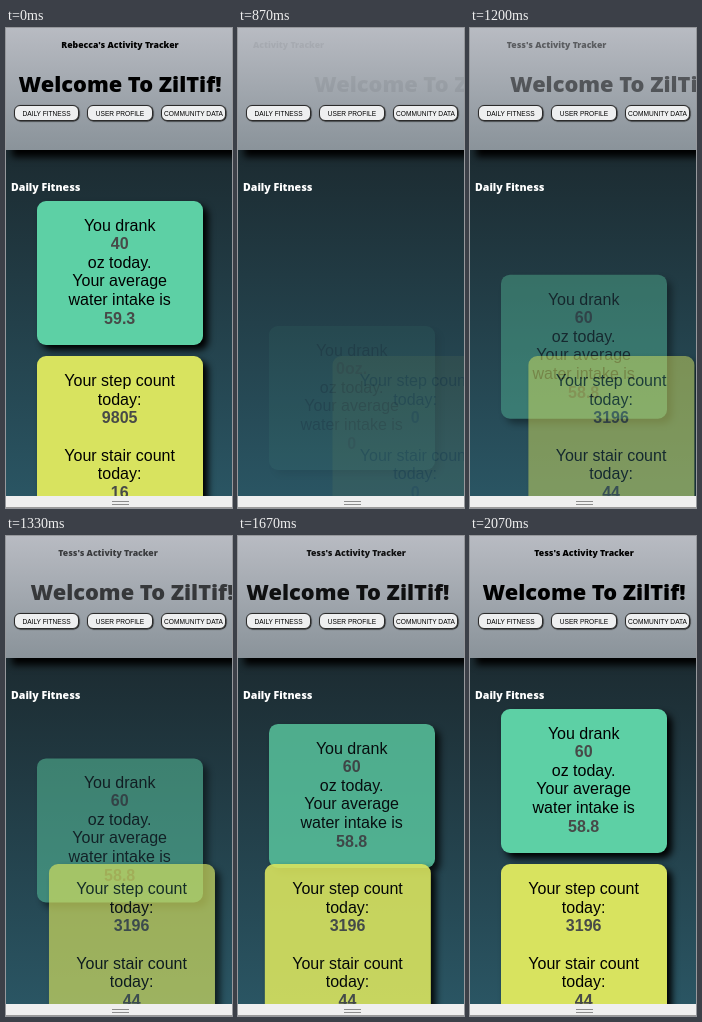
Recreate the animation shown at these times as an HTML page. Size 226 by 480 pixels, loop 2270 ms.

```html
<!DOCTYPE html>
<html lang="en">
<head>
<meta charset="utf-8">
<title>Activity Tracker</title>
<style>
  html, body { margin: 0; width: 100%; height: 100%; overflow: hidden; }
  #stage {
    position: relative; width: 226px; height: 480px; overflow: hidden;
    background: linear-gradient(#1c2b31 122px, #2a5563 468px);
    font-family: "Liberation Sans", Arial, sans-serif;
  }
  #stage div { position: absolute; box-sizing: border-box; white-space: pre; }
  .head { font-family: "Open Sans", sans-serif; font-weight: 800; }
  #header {
    left: 0; top: 0; width: 226px; height: 122px;
    background: linear-gradient(#b8bbc2, #8a939a);
    box-shadow: 6px 7px 7px #000;
  }
  #sub, #title { left: 0; width: 228px; text-align: center; color: #000; }
  #sub { top: 7px; font-size: 8.7px; line-height: 20px; }
  #title { top: 35.5px; font-size: 21.8px; line-height: 40px; }
  .btn {
    top: 77px; height: 16px; border: 1px solid #2b2b2b; border-radius: 6px;
    background: #eeeff0; box-shadow: 0.5px 0.5px 1px #111;
    font-size: 6.6px; line-height: 15px; text-align: center; color: #000;
  }
  #section { left: 5px; top: 149px; font-size: 10.6px; line-height: 20px; color: #fff; }
  .card {
    left: 30.5px; width: 166.3px; padding-top: 15.7px; border-radius: 9px;
    box-shadow: 5px 5px 7px #000;
    font-size: 16px; line-height: 18.6px; text-align: center; color: #000;
  }
  .card b { color: #474a48; }
  #water { top: 173px; height: 144px; background: #5dd0a5; }
  #steps { top: 328px; height: 170px; padding-top: 16.2px; background: #d8e35f; }
  #bar {
    left: 0; top: 468px; width: 226px; height: 12px;
    background: #efefef; border-bottom: 1px solid #999;
  }
  #bar i { position: absolute; left: 106px; width: 17px; height: 1px; background: #8c8c8c; }
</style>
</head>
<body>
<div id="stage">
  <div id="header">
    <div id="sub" class="head"></div>
    <div id="title" class="head">Welcome To ZilTif!</div>
    <div class="btn" style="left:8px;width:65px">DAILY FITNESS</div>
    <div class="btn" style="left:81px;width:66px">USER PROFILE</div>
    <div class="btn" style="left:155px;width:65px">COMMUNITY DATA</div>
  </div>
  <div id="section" class="head">Daily Fitness</div>
  <div id="water" class="card"></div>
  <div id="steps" class="card"></div>
  <div id="bar"><i style="top:5px"></i><i style="top:8px"></i></div>
</div>
<script>
const LOOP = 2270, FPS = 15, RELOAD = 866, LOADED = 1195;
const $ = id => document.getElementById(id);
const sub = $('sub'), title = $('title'), water = $('water'), steps = $('steps');

const users = [
  { sub: "Rebecca's Activity Tracker", drank: '40', avg: '59.3', steps: '9805', stairs: '16' },
  { sub: 'Activity Tracker', drank: '0oz.', avg: '0', steps: '0', stairs: '0' },
  { sub: "Tess's Activity Tracker", drank: '60', avg: '58.8', steps: '3196', stairs: '44' }
];

// Key times and the values of each property at them
const times = [870, 1070, 1330, 1530, 1800, 2070];
const slide = [63.5, 43.5, 12.3, -0.7, -5, 0];
const rise = [125, 98, 50, 27, 6, 0];
const fadeSlide = [0.06, 0.3, 0.66, 0.83, 0.95, 1];
const fadeRise = [0.06, 0.25, 0.48, 0.69, 0.85, 1];

function slope(v, i) {
  const last = times.length - 1;
  if (i === last) return 0;
  const a = Math.max(0, i - 1), b = i + 1;
  return (v[b] - v[a]) / (times[b] - times[a]);
}

// Smooth curve through the key values
function curve(v, t) {
  const last = times.length - 1;
  if (t <= times[0]) return v[0];
  if (t >= times[last]) return v[last];
  let i = 0;
  while (t >= times[i + 1]) i++;
  const d = times[i + 1] - times[i], s = (t - times[i]) / d, r = 1 - s;
  return v[i] * (1 + 2 * s) * r * r + v[i + 1] * s * s * (3 - 2 * s)
    + d * s * r * (slope(v, i) * r - slope(v, i + 1) * s);
}

let shown = -1;
function fill(n) {
  if (n === shown) return;
  shown = n;
  const u = users[n];
  sub.textContent = u.sub;
  water.innerHTML = `You drank\n<b>${u.drank}</b>\noz today.\nYour average\nwater intake is\n<b>${u.avg}</b>`;
  steps.innerHTML = `Your step count\ntoday:\n<b>${u.steps}</b>\n\nYour stair count\ntoday:\n<b>${u.stairs}</b>`;
}

function pose(el, x, y, alpha) {
  el.style.transform = `translate(${x}px, ${y}px)`;
  el.style.opacity = Math.min(1, alpha);
}

function draw(ms) {
  const t = Math.floor(ms * FPS / 1000 + 0.06) * 1000 / FPS;
  const idle = t < RELOAD;
  const at = idle ? LOOP : t;
  fill(idle ? 0 : t < LOADED ? 1 : 2);
  const x = curve(slide, at), fade = curve(fadeSlide, at);
  pose(sub, -x, 0, fade);
  pose(title, x, 0, fade);
  pose(steps, x, 0, fade);
  pose(water, 0, curve(rise, at), curve(fadeRise, at));
}

const start = performance.now();
function tick() {
  draw((performance.now() - start) % LOOP);
  requestAnimationFrame(tick);
}
tick();
</script>
</body>
</html>
```
